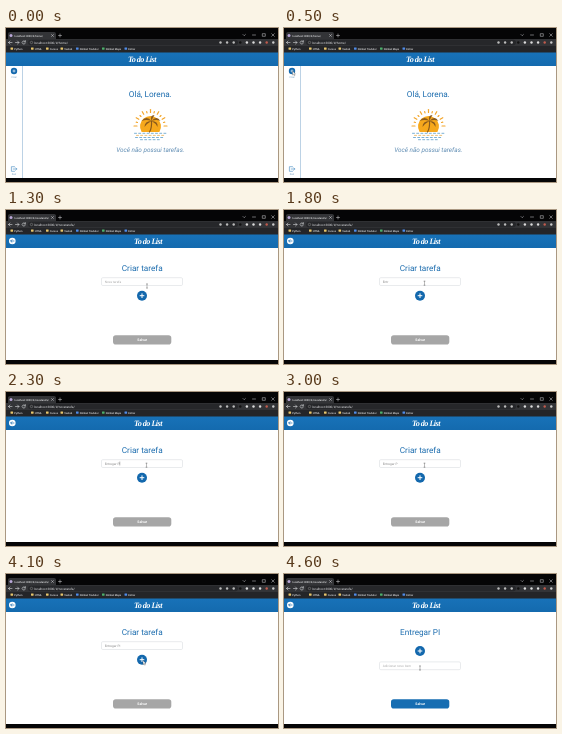
An HTML page for the animation above (4700 ms loop, 272 px wide and 154 px high).

```html
<!DOCTYPE html>
<html lang="pt">
<head>
<meta charset="utf-8">
<title>To do List</title>
<style>
html, body { margin: 0; width: 100%; height: 100%; overflow: hidden; background: #000; }
svg { display: block; width: 100vw; height: 100vh; }
text { font-family: Roboto, "Open Sans", sans-serif; text-rendering: geometricPrecision; white-space: pre; }
.mid { text-anchor: middle; }
.brand { font: italic bold 8.2px "Liberation Serif", serif; letter-spacing: -.55px; fill: #fff; }
.big { font-size: 8.2px; fill: #1b6cae; }
.tiny { font-size: 2.6px; font-weight: 500; fill: #e2e3e5; }
.url { font-size: 3.1px; fill: #e4e5e8; }
.line { fill: none; stroke-linecap: round; stroke-linejoin: round; }
</style>
</head>
<body>
<svg viewBox="0 0 272 154" preserveAspectRatio="none">
  <defs>
    <linearGradient id="bar" x2="0" y2="1">
      <stop offset="0" stop-color="#1872b8"/>
      <stop offset="1" stop-color="#146aae"/>
    </linearGradient>
    <g id="plus">
      <circle r="5" fill="#1368ad"/>
      <path d="M-2.3 0H2.3M0-2.3V2.3" stroke="#fff"/>
    </g>
  </defs>

  <!-- browser window -->
  <rect width="272" height="154" fill="#050506"/>
  <path d="M2 11V6q0-2 2-2H48q2 0 2 2V11H272V18H0V11Z" fill="#333437"/>
  <rect y="18" width="272" height="7" fill="#242528"/>
  <circle cx="5" cy="7.500" r="1.500" fill="#b9a7d8"/>
  <text id="tab" class="tiny" x="8.500" y="8.500"></text>
  <path class="line" stroke="#d4d5d8" stroke-width=".5" d="M45.500 6.500l2 2m0-2l-2 2M52.500 7.500h3m-1.500-1.500v3M237 6.500l1.200 1.200 1.200-1.200M246.500 7h3M256.700 5.700h2.600v2.600h-2.600zM265.700 5.700l2.600 2.600m0-2.600l-2.600 2.600"/>
  <rect x="22" y="11.700" width="210" height="5.600" rx="2.800" fill="#26272a"/>
  <path class="line" stroke="#d4d5d8" stroke-width=".6" d="M6 14.500H2.500m1.500-1.500l-1.500 1.500 1.500 1.500M9.500 14.500H13m-1.500-1.500l1.500 1.500-1.500 1.500M19.200 13.700a1.600 1.600 0 1 0 .1 1.400M19.400 12.600v1.300h-1.300"/>
  <circle cx="25.500" cy="14.500" r="1.200" fill="none" stroke="#aaa" stroke-width=".4"/>
  <text id="url" class="url" x="28" y="15.600"></text>
  <g id="tools"></g>
  <g id="marks"></g>

  <!-- page -->
  <rect y="25" width="272" height="125" fill="#fff"/>
  <rect y="24.500" width="272" height="13.500" fill="url(#bar)"/>
  <text id="brand" class="brand mid" y="33.600">To do List</text>

  <g id="home">
    <path d="M16.500 38V150" stroke="#8fb4d3" stroke-width=".6"/>
    <use href="#plus" transform="translate(8 43) scale(.64)"/>
    <text class="mid" x="8" y="49.800" font-size="2.600" fill="#6d98bd">Criar</text>
    <path class="line" stroke="#3f86bf" stroke-width=".6" d="M8.500 138.700H5.400v4.600h3.100M7.200 141h3.600m-1.200-1.200l1.200 1.200-1.200 1.200"/>
    <text class="mid" x="8" y="147.300" font-size="2.600" fill="#6d98bd">Sair</text>
    <text class="big mid" x="144.300" y="69.200">Olá, Lorena.</text>
    <g transform="translate(144.500 96)">
      <g id="rays" class="line" stroke="#f3a62b" stroke-width="1.200"></g>
      <path d="M-8.900 8A10.500 10.500 0 1 1 8.900 8Z" fill="#f6a81c"/>
      <path class="line" stroke="#8a5a1c" stroke-width="1.200" d="M-1 8Q1.500 4 1-3"/>
      <path fill="#8a5a1c" d="M1-3Q-4-9-9-3Q-4-5 1-3Q-6-3-6 3Q-3-1 1-3Q6-9 10-3Q6-5 1-3Q8-3 7 3Q5-1 1-3Q-1-9 4-9Q2-6 1-3Z"/>
      <g class="line" stroke-width=".8" stroke-dasharray="2 2.200">
        <path stroke="#5b9dcb" d="M-16 9.300H16M-10 15.700H11"/>
        <path stroke="#e9b45a" d="M-14 11.400H15"/>
        <path stroke="#5b9dcb" d="M-15 13.500H14"/>
      </g>
    </g>
    <text class="mid" x="144.300" y="124.300" font-size="6.400" font-style="italic" fill="#5d8bb2">Você não possui tarefas.</text>
  </g>

  <g id="form">
    <circle cx="6.300" cy="31" r="3.300" fill="#fff"/>
    <path class="line" stroke="#1368ad" stroke-width=".7" d="M8 31H4.700m1.300-1.300L4.700 31l1.300 1.300"/>
    <text id="title" class="big mid" x="136.200" y="60.500"></text>
    <g id="field">
      <rect x="95.500" y="67.700" width="81" height="7.800" rx="1.300" fill="#fff" stroke="#d3d7db" stroke-width=".5"/>
      <text id="entry" x="98.700" y="72.700" font-size="3.200"></text>
      <path id="caret" d="M0 69.600v3.800" stroke="#444" stroke-width=".4"/>
    </g>
    <use id="add" href="#plus" x="136"/>
    <rect id="save" x="107" y="125.200" width="58.300" height="9.300" rx="2.800"/>
    <text class="mid" x="136.200" y="131.100" font-size="3.500" font-weight="700" fill="#fff">Salvar</text>
  </g>

  <g id="pointer">
    <path id="arrow" d="M0 0V4l1-.9.7 1.600.7-.3-.7-1.500h1.300Z" fill="#fff" stroke="#333" stroke-width=".3"/>
    <path id="beam" class="line" d="M-.6-2H.6M0-2V2M-.6 2H.6" stroke="#555" stroke-width=".4"/>
  </g>
</svg>
<script>
const LOOP = 4700, STEP = 100, OPEN = 700, ADDED = 4300;
const $ = id => document.getElementById(id);
const show = (id, on) => $(id).setAttribute('visibility', on ? 'inherit' : 'hidden');
const write = (id, s) => { if ($(id).textContent !== s) $(id).textContent = s; };

const bookmarks = [
  [4.5, 'Python', '#e7c56b'], [25, 'HTML', '#e7c56b'], [40, 'Cursos', '#e7c56b'],
  [54.5, 'Vexlab', '#e7c56b'], [70, 'Nimbel Tradutor', '#4f8be8'],
  [96, 'Nimbel Maps', '#4caf6a'], [118.5, 'Entrar', '#4f8be8']
];
$('marks').innerHTML = bookmarks.map(([x, label, color]) =>
  `<rect x="${x}" y="19.400" width="2.600" height="2.300" rx=".4" fill="${color}"/>
   <text class="tiny" x="${x + 3.8}" y="21.500">${label}</text>`).join('');

const tools = ['#bbb', '#bbb', '#bbb', '#111', '#ddd', '#ddd', '#ddd', '#c25b4d', '#ccc'];
$('tools').innerHTML = tools.map((color, i) =>
  `<circle cx="${214.5 + i * 6.6}" cy="14.500" r="1.200" fill="${color}"/>`).join('');

let rays = '';
for (let i = 0; i <= 12; i++) {
  const a = Math.PI * (1 + i / 12), r = i % 2 ? 14.8 : 16.5;
  const at = d => `${d * Math.cos(a)} ${d * Math.sin(a) + 2}`;
  rays += `<path d="M${at(13.5)}L${at(r)}"/>`;
}
$('rays').innerHTML = rays;

// time, x, y
const path = [
  [0, 20, 62], [100, 18, 58], [400, 8.5, 43], [700, 8.5, 43], [1200, 141, 76],
  [1500, 141, 76], [1800, 140.5, 73.2], [3100, 140.5, 73.2], [3500, 143, 76],
  [3900, 137, 86], [4300, 137, 87], [4500, 136, 94], [LOOP, 136, 94]
];
function pointerAt(t) {
  const i = path.findIndex(p => p[0] > t);
  const [t0, x0, y0] = path[i - 1], [t1, x1, y1] = path[i];
  const k = (t - t0) / (t1 - t0), e = k * k * (3 - 2 * k);
  return [x0 + (x1 - x0) * e, y0 + (y1 - y0) * e];
}

function typed(t) {
  if (t >= 3200) return 'Entregar PI';
  if (t >= 2200) return 'Entregar P';
  return 'Entregar '.slice(0, Math.max(0, Math.floor((t - 1400) / 85)));
}

function draw(t) {
  const form = t >= OPEN, added = t >= ADDED;
  const address = 'localhost:3000/#/' + (form ? 'novatarefa/' : 'home/');
  show('home', !form);
  show('form', form);
  write('tab', address);
  write('url', address);
  $('brand').setAttribute('x', form ? 142 : 136);

  const text = added ? '' : typed(t);
  write('title', added ? 'Entregar PI' : 'Criar tarefa');
  write('entry', text || (added ? 'Adicionar novo item' : 'Nova tarefa'));
  $('entry').setAttribute('fill', text ? '#858585' : '#a8a8a8');
  $('field').setAttribute('transform', `translate(0 ${added ? 20.2 : 0})`);
  $('add').setAttribute('y', added ? 77 : 85.7);
  $('save').setAttribute('fill', added ? '#166db2' : '#a6a6a6');

  const blink = t % 1000 >= 250 && t % 1000 < 750;
  show('caret', form && text && blink && t < 3700);
  if (text) $('caret').setAttribute('transform', `translate(${99 + $('entry').getComputedTextLength()} 0)`);

  const [x, y] = pointerAt(t);
  const overField = form && x > 95 && (added ? y > 87 : y < 78);
  $('pointer').setAttribute('transform', `translate(${x} ${y})`);
  show('pointer', t >= 100);
  $('arrow').style.display = overField ? 'none' : '';
  $('beam').style.display = overField ? '' : 'none';
}

const start = performance.now();
function tick() {
  const t = (performance.now() - start) % LOOP;
  draw(Math.floor(t / STEP) * STEP);
  requestAnimationFrame(tick);
}
tick();
</script>
</body>
</html>
```
